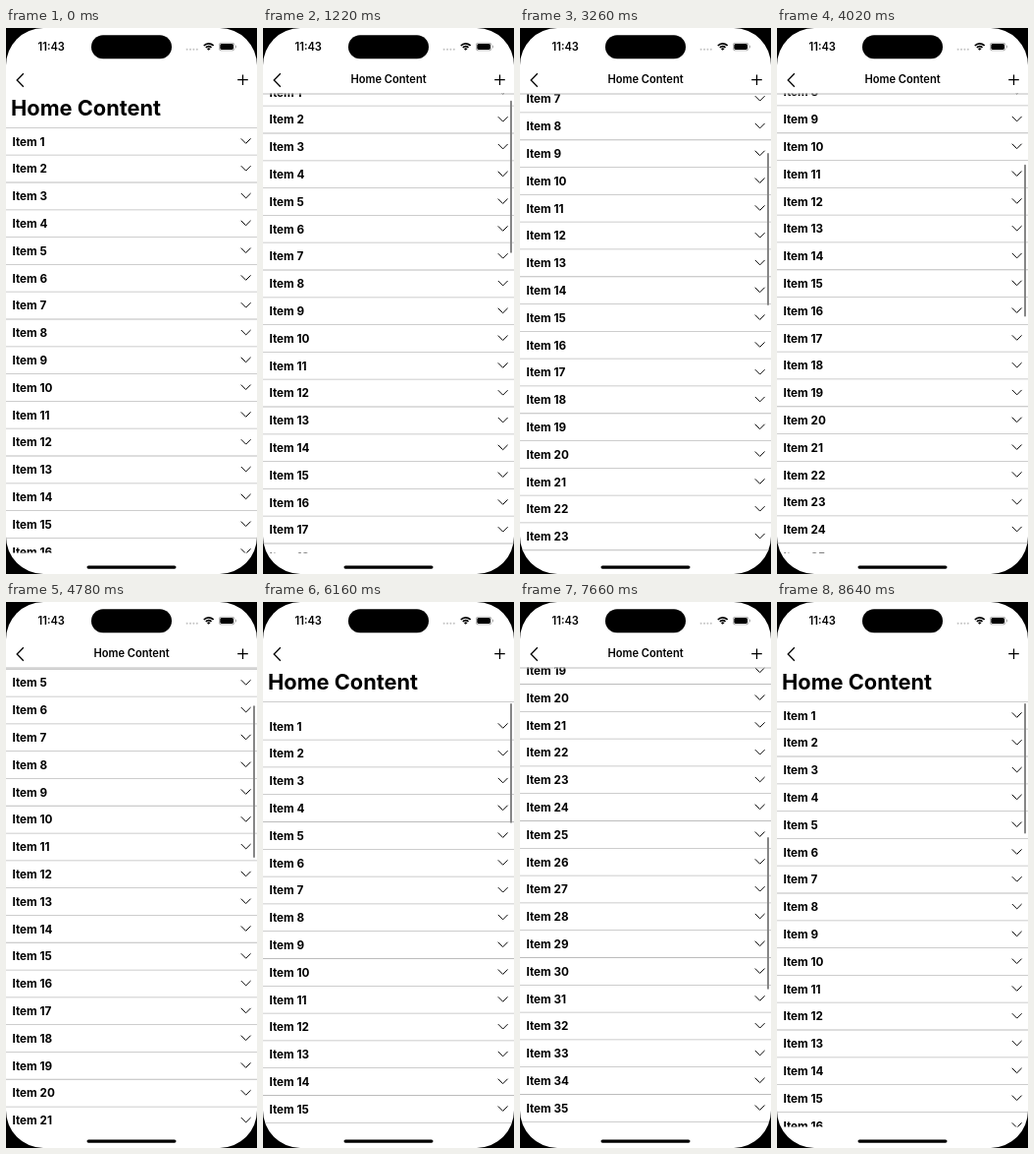
Recreate the animation shown at these times as an HTML page with a canvas. Size 256 by 555 pixels, loop 8660 ms.

```html
<!DOCTYPE html>
<html lang="en">
<head>
<meta charset="utf-8">
<title>Home Content</title>
<style>
  html, body { margin: 0; height: 100%; overflow: hidden; background: #000; }
  canvas { display: block; }
</style>
</head>
<body>
<canvas id="stage" width="256" height="555"></canvas>
<script>
const ctx = document.getElementById('stage').getContext('2d');
const W = 256, H = 555, LOOP = 8660, WAKE = 640;
const ROW = 27.8, ITEMS = 50, EXPANDED = 101, COLLAPSED = 66.6, BOTTOM = 533.5;

// Scroll position over time: [ms, px]
const keys = [
  [0, 0], [620, 0], [1000, 50], [1220, 50], [1980, 139.5], [3260, 210], [4000, 245],
  [4780, 144.5], [5600, -7], [5760, -11], [6150, -11], [7660, 546], [7800, 552],
  [8630, 0], [LOOP, 0]
];

const clamp = (v, lo, hi) => Math.min(hi, Math.max(lo, v));
const speed = i => (keys[i + 1][1] - keys[i][1]) / (keys[i + 1][0] - keys[i][0]);

// Slope that keeps the curve monotone between keys
function slope(i) {
  if (i === 0 || i === keys.length - 1) return 0;
  const a = speed(i - 1), b = speed(i);
  return a * b > 0 ? 2 * a * b / (a + b) : 0;
}

function scrollAt(t) {
  let i = 0;
  while (i < keys.length - 2 && t >= keys[i + 1][0]) i++;
  const [t0, y0] = keys[i], [t1, y1] = keys[i + 1];
  const d = t1 - t0, u = (t - t0) / d, v = 1 - u;
  return v * v * (1 + 2 * u) * y0 + u * u * (3 - 2 * u) * y1
    + d * u * v * (v * slope(i) - u * slope(i + 1));
}

function box(x, y, w, h, color, r = 0) {
  ctx.fillStyle = color;
  ctx.beginPath();
  ctx.roundRect(x, y, w, h, r);
  ctx.fill();
}

function text(str, x, y, size, weight, align = 'left') {
  ctx.font = `${weight} ${size}px Inter, sans-serif`;
  ctx.textAlign = align;
  ctx.fillStyle = '#000';
  ctx.fillText(str, x, y);
}

function stroke(width, ...points) {
  ctx.lineWidth = width;
  ctx.strokeStyle = '#000';
  ctx.beginPath();
  points.forEach(([x, y]) => ctx.lineTo(x, y));
  ctx.stroke();
}

function clipped(top, bottom, paint) {
  ctx.save();
  ctx.beginPath();
  ctx.rect(0, top, W, bottom - top);
  ctx.clip();
  paint();
  ctx.restore();
}

const rule = y => box(0, y, W, 0.8, '#bcbcbc');

function drawList(scroll, head) {
  clipped(head, BOTTOM, () => {
    for (let n = 0; n < ITEMS; n++) {
      const y = EXPANDED + ROW * n - scroll;
      if (y < head - ROW || y > BOTTOM) continue;
      text(`Item ${n + 1}`, 6.5, y + 18.6, 11.7, 700);
      stroke(1, [239.8, y + 11.4], [244.7, y + 16.3], [249.6, y + 11.4]);
      rule(y + ROW);
    }
  });
}

function drawIndicator(scroll, head) {
  const view = BOTTOM - head;
  const top = head + 2 + Math.max(0, scroll - (EXPANDED - head)) * 0.333;
  const length = view * view / (ROW * ITEMS) - 2 + Math.min(0, scroll);
  box(252, top, 2, length, '#868686', 1);
}

function drawHeader(scroll, head) {
  clipped(COLLAPSED, head, () =>
    text('Home Content', 5, 89.3 - Math.max(0, scroll), 21.8, 700));
  ctx.globalAlpha = clamp((scroll - 22) / 10, 0, 1);
  text('Home Content', W / 2, 56, 11.1, 600, 'center');
  ctx.globalAlpha = 1;
  rule(head);
  stroke(1.3, [17.8, 46.3], [11.2, 53], [17.8, 59.7]);
  stroke(1.3, [236.2, 52.7], [246.8, 52.7]);
  stroke(1.3, [241.5, 47.4], [241.5, 58]);
}

function drawStatus() {
  text('11:43', 32.5, 23.2, 11.1, 600);
  box(87, 7.2, 82, 24, '#000', 12);
  for (let i = 0; i < 4; i++) box(183.6 + i * 3.4, 20.8, 2, 2, '#c4c4c4', 1);

  ctx.strokeStyle = '#000';
  ctx.lineWidth = 1.7;
  for (const r of [3.9, 6.7]) {
    ctx.beginPath();
    ctx.arc(206.7, 22.6, r, -Math.PI * 0.76, -Math.PI * 0.24);
    ctx.stroke();
  }
  ctx.fillStyle = '#000';
  ctx.beginPath();
  ctx.moveTo(206.7, 22.8);
  ctx.arc(206.7, 22.8, 2.4, -Math.PI * 0.76, -Math.PI * 0.24);
  ctx.fill();

  box(217, 14.8, 16.3, 8.4, '#a6a6a6', 2.8);
  box(217.7, 15.5, 14.9, 7, '#fff', 2.2);
  box(218.3, 16.1, 13.7, 5.8, '#000', 1.6);
  box(234, 17.6, 0.9, 2.8, '#a6a6a6', 0.5);
}

function draw(now) {
  const t = now % LOOP;
  const scroll = t < WAKE ? 0 : scrollAt(t);
  const head = clamp(EXPANDED - scroll, COLLAPSED, EXPANDED);

  box(0, 0, W, H, '#000');
  box(0, 0, W, H, '#fff', 38);
  ctx.save();
  ctx.clip();
  drawList(scroll, head);
  if (t >= WAKE) drawIndicator(scroll, head);
  drawHeader(scroll, head);
  drawStatus();
  box(82.5, 546.5, 91, 3.2, '#000', 1.6);
  ctx.restore();
}

const start = performance.now();
function tick() {
  draw(performance.now() - start);
  requestAnimationFrame(tick);
}
tick();
</script>
</body>
</html>
```
